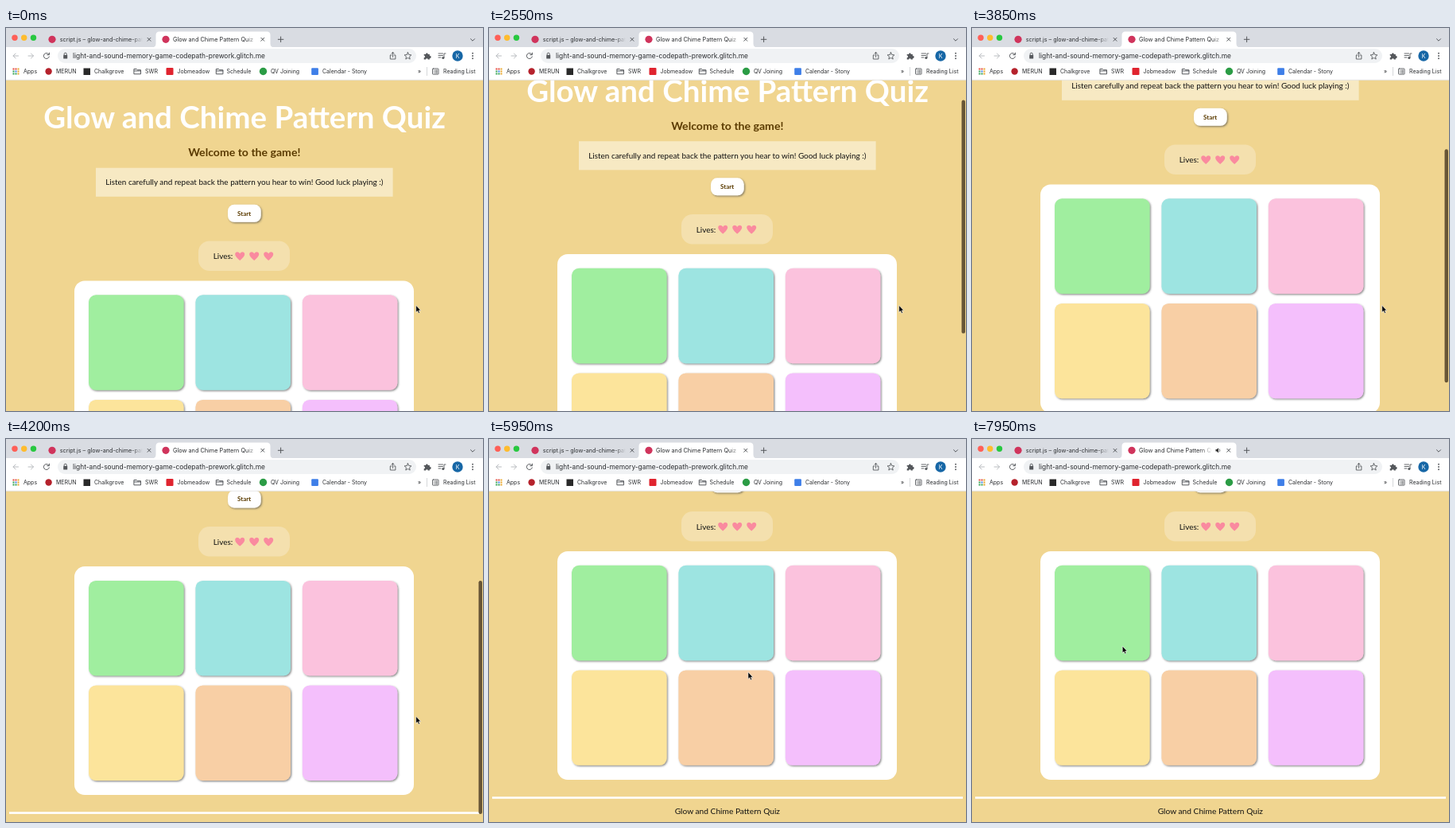
An HTML page that plays this animation: 600x481 px, repeating every 8000 ms.

```html
<!DOCTYPE html>
<html lang="en">
<head>
<meta charset="utf-8">
<title>Memory game</title>
<style>
  html, body { margin: 0; width: 100%; height: 100%; overflow: hidden; background: #f0d590; }
  svg { display: block; width: 100%; height: 100%; }
  text { white-space: pre; }
  .ui { font-family: Inter, Roboto, sans-serif; font-size: 7px; fill: #2b2d30; }
  .page { font-family: Lato, sans-serif; font-size: 9.95px; fill: #111; }
  .mid { text-anchor: middle; }
  .bold { font-weight: 700; }
  .line { fill: none; stroke: #55585c; stroke-width: 1; stroke-linecap: round; stroke-linejoin: round; }
</style>
</head>
<body>
<svg viewBox="0 0 600 481">
  <defs>
    <filter id="soft" x="-10%" y="-10%" width="125%" height="130%">
      <feDropShadow dx="1.2" dy="1.2" stdDeviation="1.1" flood-color="#444" flood-opacity=".65"/>
    </filter>
    <linearGradient id="fadeInactive" gradientUnits="userSpaceOnUse" x1="158" x2="172">
      <stop stop-color="#d9dce2" stop-opacity="0"/><stop offset="1" stop-color="#d9dce2"/>
    </linearGradient>
    <linearGradient id="fadeActive" gradientUnits="userSpaceOnUse" x1="302" x2="316">
      <stop stop-color="#fff" stop-opacity="0"/><stop offset="1" stop-color="#fff"/>
    </linearGradient>
    <clipPath id="view"><rect y="65" width="600" height="416"/></clipPath>
    <path id="heart" d="M0 5.4C-3 3-6-.1-6-2.5C-6-5.9-1.6-6.4 0-3.2C1.6-6.4 6-5.9 6-2.5C6-.1 3 3 0 5.4Z" fill="#fa8a9f"/>
    <path id="folder" class="line" d="M-4-3h3l1 1.2h4.2V3.3H-4Z M-4-.6h8.2"/>
    <path id="close" class="line" d="M-2-2L2 2M2-2L-2 2"/>
  </defs>

  <rect width="600" height="481" fill="#f0d590"/>
  <g clip-path="url(#view)">
    <g id="content" class="page">
      <text class="mid bold" x="300" y="126.3" style="font-size:38.5px" fill="#fff">Glow and Chime Pattern Quiz</text>
      <text class="mid bold" x="299.8" y="161.3" style="font-size:14.1px" fill="#5b3b00">Welcome to the game!</text>
      <rect x="113" y="175.700" width="373.600" height="36.100" fill="#f7e9c3"/>
      <text class="mid" x="299.8" y="197.2">Listen carefully and repeat back the pattern you hear to win! Good luck playing :)</text>
      <rect x="279" y="221.800" width="41.700" height="22" rx="8" fill="#fff" filter="url(#soft)"/>
      <text class="mid bold" x="299.6" y="235.6" style="font-size:8px" fill="#5b3b00">Start</text>
      <rect x="242" y="267.500" width="115" height="37.500" rx="14" fill="#f4e0ae"/>
      <text x="260.7" y="290">Lives:</text>
      <use href="#heart" x="294.2" y="286.6"/>
      <use href="#heart" x="312.2" y="286.6"/>
      <use href="#heart" x="330.2" y="286.6"/>
      <rect x="86" y="317.5" width="427" height="287" rx="13" fill="#fff"/>
      <g id="tiles"></g>
      <rect x="4" y="625.7" width="592" height="2.6" fill="#fff"/>
      <text class="mid" x="299.8" y="647.6" style="font-size:10.2px">Glow and Chime Pattern Quiz</text>
    </g>
    <rect id="thumb" x="594.5" width="4.5" height="293" rx="2.2" fill="#675536"/>
  </g>

  <g class="ui">
    <rect width="600" height="25" fill="#d9dce2"/>
    <rect y="24" width="600" height="41.5" fill="#fff"/>
    <circle cx="11" cy="12.3" r="3.7" fill="#ff5f57"/>
    <circle cx="22.7" cy="12.3" r="3.7" fill="#febc2e"/>
    <circle cx="34.5" cy="12.3" r="3.7" fill="#28c840"/>

    <circle cx="58" cy="14.3" r="4.6" fill="#d0345c"/>
    <text x="67.8" y="17" style="font-size:7.2px">script.js – glow-and-chime-patt</text>
    <rect x="158" y="8" width="17" height="13" fill="url(#fadeInactive)"/>
    <use href="#close" x="180" y="14.3"/>
    <path d="M184 24.5Q188.5 24 188.5 19.5V9Q188.5 4.5 193 4.5H328Q332.5 4.5 332.5 9V19.5Q332.5 24 337 24.5Z" fill="#fff"/>
    <circle cx="201" cy="14.3" r="4.6" fill="#d0345c"/>
    <text x="210" y="17" style="font-size:7.3px">Glow and Chime Pattern Quiz</text>
    <g id="fade">
      <rect x="302" y="8" width="14" height="13" fill="url(#fadeActive)"/>
      <rect x="316" y="8" width="16" height="13" fill="#fff"/>
    </g>
    <g id="speaker">
      <path d="M306.5 13h1.5l2-1.8v6.2l-2-1.8h-1.5Z" fill="#333"/>
      <path class="line" style="stroke-width:.8" d="M311.3 12.7q1.3 1.6 0 3.2"/>
    </g>
    <use href="#close" x="322.8" y="14.3"/>
    <path class="line" d="M342.3 14.3h6.6M345.6 11v6.6M584.5 13.7l2.5 2.5l2.5-2.5"/>

    <g class="line">
      <path d="M15.5 35H9M12 32L9 35l3 3M28 35h6.5M31.5 32l3 3l-3 3" stroke="#b9bcc0"/>
      <path d="M53.7 32.9A3.5 3.5 0 1 0 54.3 36M54.4 31.2v2.5h-2.6"/>
    </g>
    <rect x="65" y="26" width="451" height="18" rx="9" fill="#f0f2f4"/>
    <rect x="72.2" y="34" width="5" height="4.5" rx=".6" fill="#55585c"/>
    <path class="line" d="M73.2 34v-1.3a1.5 1.5 0 0 1 3 0V34"/>
    <text x="84" y="38.2" style="font-size:8.4px">light-and-sound-memory-game-codepath-prework.glitch.me</text>
    <g class="line" style="stroke-width:.9">
      <path d="M485 34h-1.7v5h6.6v-5h-1.7M486.6 36.5v-6M484.9 32.1l1.7-1.7l1.7 1.7"/>
      <path d="M505.5 30.7l1.3 2.9l3.1.3l-2.4 2.1l.7 3.1l-2.7-1.6l-2.7 1.6l.7-3.1l-2.4-2.1l3.1-.3Z"/>
      <path d="M544 32h5.5M544 34.5h5.5M544 37h3M551 37.5v-5.5h2"/>
    </g>
    <circle cx="549.8" cy="37.6" r="1.5" fill="#55585c"/>
    <path d="M525.7 33h2.3a1.4 1.4 0 1 1 2.8 0h2.1v2.2a1.4 1.4 0 1 1 0 2.7v1.6h-2.2a1.3 1.3 0 1 0-2.6 0h-2.4v-2.3a1.3 1.3 0 1 0 0-2.6Z" fill="#55585c"/>
    <circle cx="568" cy="35" r="6.7" fill="#1767a6"/>
    <text class="mid" x="568" y="37.6" fill="#fff">K</text>
    <g fill="#55585c">
      <circle cx="587" cy="31.7" r=".95"/><circle cx="587" cy="35" r=".95"/><circle cx="587" cy="38.3" r=".95"/>
    </g>

    <g id="apps"></g>
    <circle cx="53.6" cy="54.5" r="4.2" fill="#b5222c"/>
    <rect x="97.5" y="50.5" width="8.5" height="8.5" fill="#2a2a2a"/>
    <use href="#folder" x="165.3" y="54.5"/>
    <rect x="201.5" y="50" width="9" height="9" rx="1" fill="#e0242f"/>
    <use href="#folder" x="268.7" y="54.5"/>
    <circle cx="323.5" cy="54.5" r="4.7" fill="#2b9c45"/>
    <rect x="384.2" y="50.2" width="8.7" height="8.7" rx="1" fill="#3f7fe8"/>
    <g id="marks"></g>
    <path d="M529.5 49v11" stroke="#d5d7da"/>
    <g class="line" style="stroke-width:.9">
      <rect x="536.5" y="51" width="7.5" height="7.2" rx=".8"/>
      <path d="M538.3 53h.1M538.3 54.7h.1M538.3 56.4h.1M540 53h2.5M540 54.7h2.5M540 56.4h2.5"/>
    </g>
    <path d="M0 65.3h600" stroke="#dcdcdc" stroke-width=".7"/>
  </g>

  <path id="cursor" d="M0 0V8.8L1.9 7L3.3 10L4.8 9.3L3.5 6.5H6.1Z" fill="#000" stroke="#fff" stroke-width=".6"/>
</svg>
<script>
const LOOP = 8000, STEP = 50;
const $ = id => document.getElementById(id);

function add(parent, tag, attrs, text) {
  const el = document.createElementNS("http://www.w3.org/2000/svg", tag);
  for (const key in attrs) el.setAttribute(key, attrs[key]);
  if (text) el.textContent = text;
  $(parent).append(el);
}

["#a0ee9f", "#9de4e1", "#fbc2dd", "#fce49b", "#f8cfa5", "#f4bffc"].forEach((fill, i) =>
  add("tiles", "rect", {
    x: 104 + 134.4 * (i % 3), y: 335.3 + 131.6 * Math.floor(i / 3),
    width: 119.6, height: 119.4, rx: 9, fill, filter: "url(#soft)"
  }));

const dots = ["#e34a3d", "#e34a3d", "#e9a62a", "#35a354", "#4285f4", "#e9a62a", "#35a354", "#35a354", "#e9a62a"];
dots.forEach((fill, i) =>
  add("apps", "rect", { x: 8.5 + 3 * (i % 3), y: 50.5 + 3 * Math.floor(i / 3), width: 2, height: 2, fill }));

[[22, "Apps"], [63, "MERUN"], [111, "Chalkgrove"], [175, "SWR"], [215.5, "Jobmeadow"], [277.5, "Schedule"],
 [333, "QV Joining"], [398, "Calendar - Stony"], [518, "»"], [550, "Reading List"]]
  .forEach(([x, label]) => add("marks", "text", { x, y: 57 }, label));

// Smooth curve through [time, value] keys, flat at the ends and at turning points.
function track(keys, t) {
  const last = keys.length - 1;
  if (t <= keys[0][0]) return keys[0][1];
  if (t >= keys[last][0]) return keys[last][1];
  const i = keys.findIndex(k => k[0] > t) - 1;
  const slope = j => {
    if (j === 0 || j === last) return 0;
    const [a, b, c] = [keys[j - 1], keys[j], keys[j + 1]];
    return (b[1] - a[1]) * (c[1] - b[1]) <= 0 ? 0 : (c[1] - a[1]) / (c[0] - a[0]);
  };
  const [t0, v0] = keys[i], [t1, v1] = keys[i + 1];
  const d = t1 - t0, u = (t - t0) / d, w = 1 - u;
  return v0 * (1 + 2 * u) * w * w + v1 * u * u * (3 - 2 * u)
    + d * u * w * (w * slope(i) - u * slope(i + 1));
}

const scrollKeys = [[2050, 0], [2550, 33.5], [3850, 121], [4500, 176.5]];
const cursorX = [[5250, 515.7], [6500, 193.8], [7000, 193.8], [7500, 189.2]];
const cursorY = [[5150, 348.3], [5250, 346.8], [6500, 268.5], [7000, 268.5], [7500, 260]];
const thumbFade = [[4800, 1], [5050, 0]];

function draw(t) {
  const scroll = track(scrollKeys, t);
  $("content").setAttribute("transform", `translate(0 ${-scroll})`);
  $("thumb").setAttribute("y", 67 + 0.705 * scroll);
  $("thumb").setAttribute("opacity", t < 2050 ? 0 : track(thumbFade, t));
  $("cursor").setAttribute("transform", `translate(${track(cursorX, t)} ${track(cursorY, t)})`);
  const sound = t >= 7550;
  $("speaker").setAttribute("visibility", sound ? "visible" : "hidden");
  $("fade").setAttribute("transform", `translate(${sound ? -14 : 0} 0)`);
}

const start = performance.now();
function tick() {
  const t = (performance.now() - start) % LOOP;
  draw(Math.floor(t / STEP) * STEP);
  requestAnimationFrame(tick);
}
tick();
</script>
</body>
</html>
```
